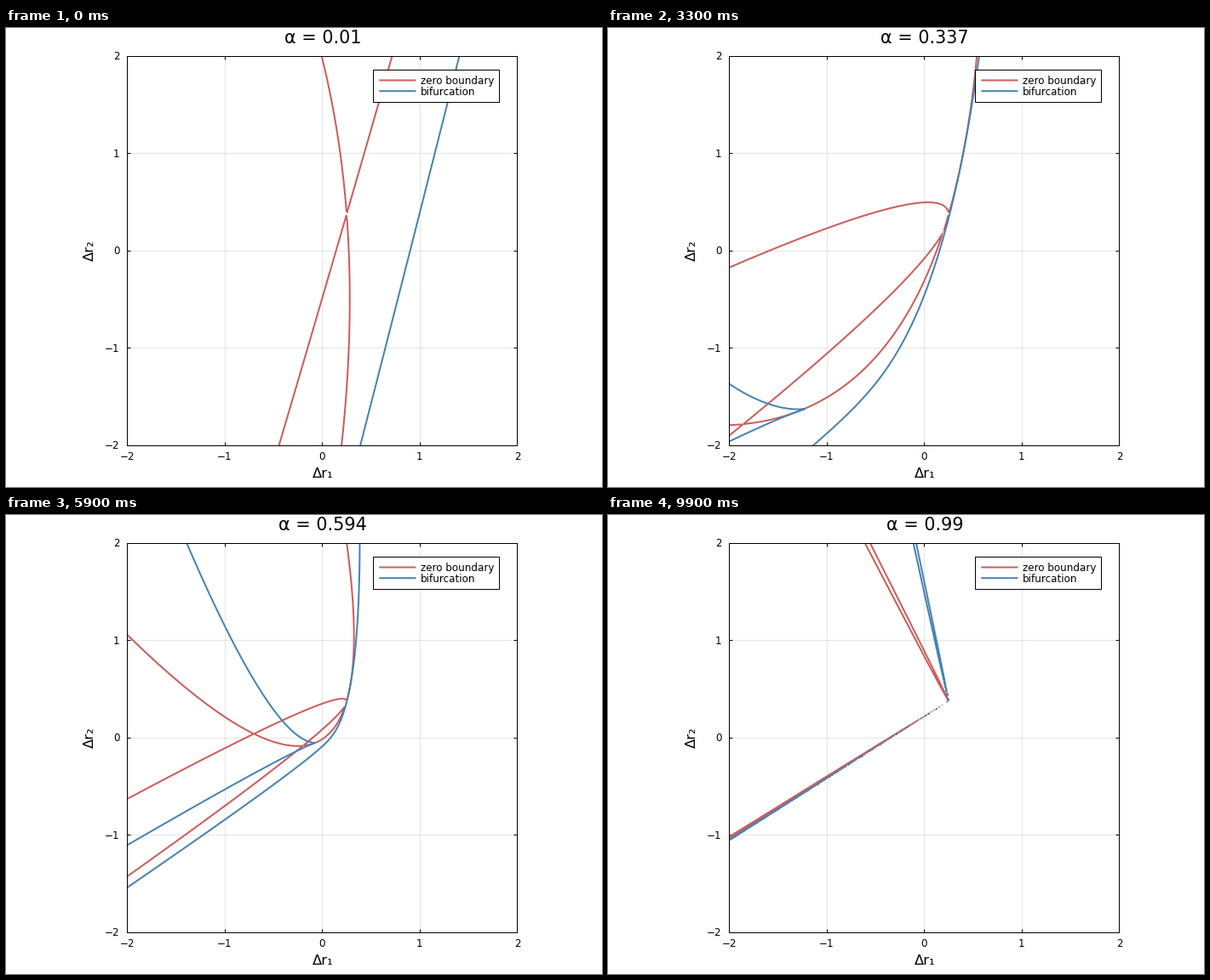
Recreate the animation shown at these times as a matplotlib script. Size 700 by 540 pixels, loop 10000 ms.

```python
import numpy as np
import matplotlib.pyplot as plt
from matplotlib.animation import FuncAnimation
from matplotlib.patches import Rectangle

plt.rcParams["path.simplify"] = False  # keep the tiny contour islands

W, H, DPI = 700, 540, 100
FRAMES = 100
PX = 72 / DPI                      # one pixel in points
RED, BLUE = "indianred", "steelblue"
LEFT, RIGHT, TOP, BOTTOM = 142.45, 600.45, 32.95, 490.95

# Quadratic map r = c + (1-a)(x VA + y VB) + a(x^2 QA + xy QC + y^2 QB)
CENTER = (0.25, 0.375)
MA, KA, GA = 0.622, -0.072, 3.945  # image of y = 0
MB, KB, GB = -0.512, 1.248, 0.2345  # image of x = 0
VA, QA = np.array([KA, 1 + MA * KA]), np.array([-GA, -MA * GA])
VB, QB = np.array([1 + MB * KB, KB]), np.array([MB * GB, GB])
QC = np.array([0.939, 0.838])

grid = np.linspace(-2, 2, 400)
R1, R2 = np.meshgrid(grid, grid)


def product(*polys):
    out = np.array([1.0])
    for p in polys:
        out = np.polymul(out, p)
    return out


# Pencil of the two conics: det(l*M1 + M2) = -(l*p1 + p2) * D - E
D = product(QA, QB) - product(QC, QC) / 4
E = (product(VA, VA, QB) - product(VA, VB, QC) + product(VB, VB, QA)) / 4


def zero_boundary(x, y):
    q = y - MA * x
    g = x - MB * y
    return (x - KA * q + GA * q**2) * (y - KB * g - GB * g**2)


def fold(x, y):
    """Discriminant of the pencil: zero where two solutions merge."""
    a = x * D[0] + E[0]
    b = x * D[1] + y * D[0] + E[1]
    c = x * D[2] + y * D[1] + E[2]
    d = y * D[2] + E[3]
    return (b**2 * c**2 - 4 * a * c**3 - 4 * b**3 * d
            + 18 * a * b * c * d - 27 * a**2 * d**2)


fig = plt.figure(figsize=(W / DPI, H / DPI), dpi=DPI, facecolor="white")
ax = fig.add_axes([LEFT / W, 1 - BOTTOM / H, (RIGHT - LEFT) / W, (BOTTOM - TOP) / H])
ax.set(xlim=(-2, 2), ylim=(-2, 2), xticks=range(-2, 3), yticks=range(-2, 3))
ax.set_axisbelow(True)
ax.grid(color="black", alpha=0.1, lw=PX)
ax.tick_params(direction="in", top=True, right=True, length=4 * PX, width=PX,
               labelbottom=False, labelleft=False)
for spine in ax.spines.values():
    spine.set_linewidth(PX)

# Pixel-space layer for text and legend
layer = fig.add_axes([0, 0, 1, 1])
layer.set(xlim=(0, W), ylim=(H, 0))
layer.axis("off")


def label(x, y, text, size, ha="center", **kw):
    return layer.text(x, y, text, fontsize=size * PX, ha=ha, va="baseline",
                      family="DejaVu Sans", color="black", **kw)


for i in range(5):
    name = str(i - 2).replace("-", "\u2212")
    label(LEFT + (RIGHT - LEFT) * i / 4, 508, name, 11.9)
    label(133.6, BOTTOM - (BOTTOM - TOP) * i / 4 + 4.5, name, 11.9, ha="right")
label(372, 528.8, "Δr₁", 16.35)
label(103.2, 261.4, "Δr₂", 16.35, rotation=90, rotation_mode="anchor")
title = label(372, 18.4, "", 20.8)

layer.add_patch(Rectangle((431.3, 48.5), 148, 38.7, fc="white", ec="black", lw=PX))
for y, color, name in ((61.5, RED, "zero boundary"), (74.2, BLUE, "bifurcation")):
    layer.plot([438.3, 481.5], [y, y], color=color, lw=2 * PX,
               solid_capstyle="butt", snap=False)
    label(487, y + 4.6, name, 11.9, ha="left")

curves = []


def update(i):
    while curves:
        curves.pop().remove()
    alpha = 0.01 + 0.98 * i / (FRAMES - 1)
    scale = (1 - alpha) ** 2 / alpha
    x, y = (R1 - CENTER[0]) / scale, (R2 - CENTER[1]) / scale
    for f, color in ((zero_boundary, RED), (fold, BLUE)):
        curve = ax.contour(grid, grid, f(x, y), levels=[0], colors=color,
                           linewidths=2 * PX)
        curve.set(capstyle="round", joinstyle="round", snap=False)
        curves.append(curve)
    title.set_text(f"α = {round(alpha, 3)}")
    return [title]


anim = FuncAnimation(fig, update, frames=FRAMES, interval=100, repeat=True,
                     repeat_delay=0, blit=False)
plt.show()
```
